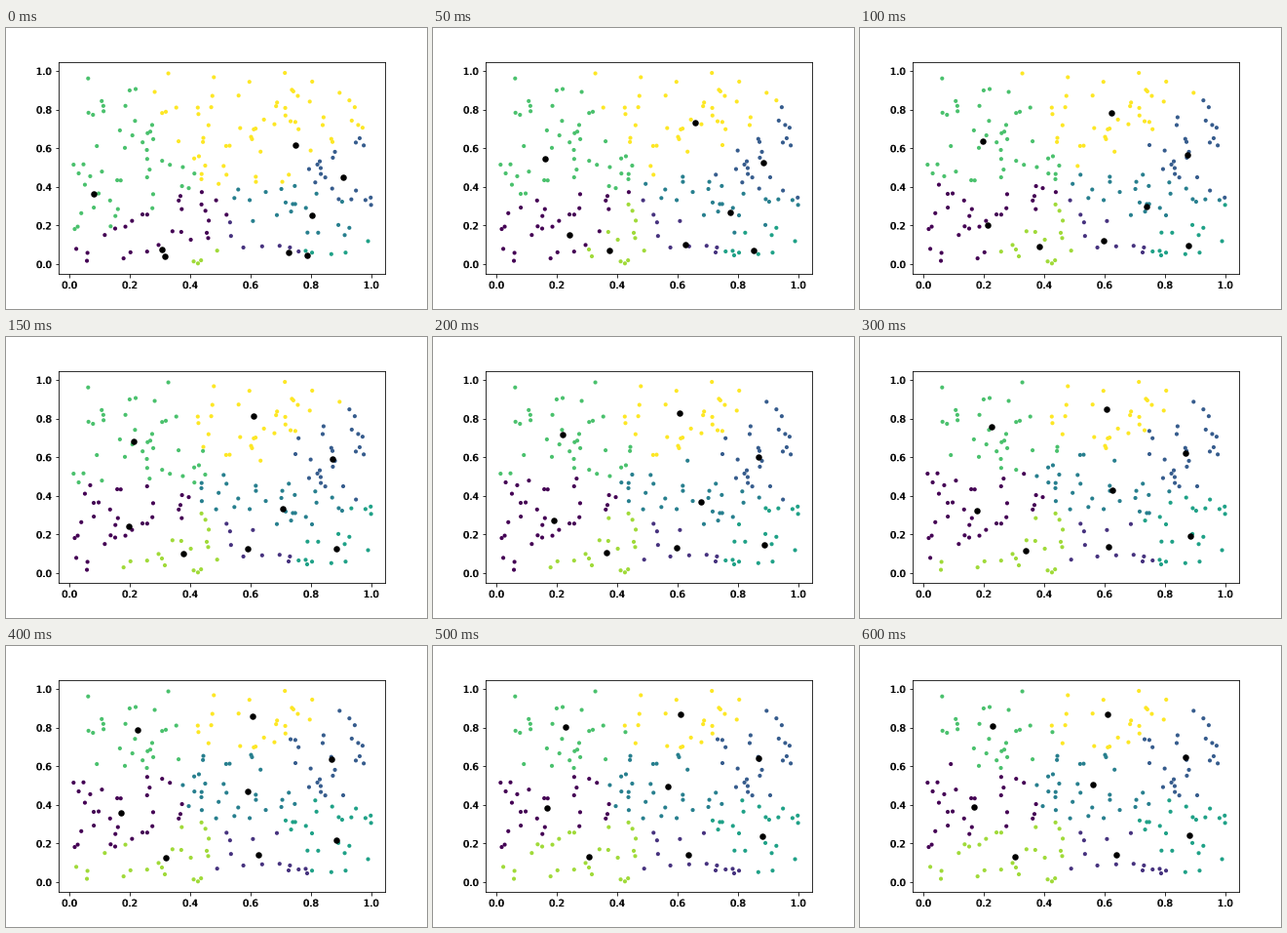
A matplotlib script that plays this animation: 432x288 px, repeating every 0.65 s.

```python
import numpy as np
import matplotlib.pyplot as plt
from matplotlib.animation import FuncAnimation
from matplotlib.patheffects import PathPatchEffect

W, H, DPI = 432, 288, 72
STEPS, INTERVAL = 13, 50
N_POINTS = 200

# Stage position of the data origin and size of one data unit
ORIGIN = np.array([65.3, 242.0])
UNIT = np.array([309.7, -198.0])


def to_data(p):
    return (np.asarray(p, float) - ORIGIN) / UNIT


# Each cluster centre, in stage pixels: where it starts, which way it
# is pulled at first, where it settles
START, PULL, END = to_data([
    [(160, 227), (130, 215), (117, 165)],
    [(290, 230), (230, 217), (263, 214)],
    [(346, 153), (334, 132), (334, 114)],
    [(314, 192), (320, 203), (239, 142)],
    [(309, 233), (344, 236), (338, 194)],
    [(90, 170), (131, 120), (136, 82)],
    [(163, 234), (205, 226), (159, 216)],
    [(297, 120), (248, 86), (254, 70)],
]).swapaxes(0, 1)


def centres_at(step):
    """A quick first jump that fades into a slow drift."""
    jump = 0.4 ** step
    drift = (1 - step / (STEPS - 1)) ** 2
    return END + jump * (START - PULL) + drift * (PULL - END)


def nearest(points, centres):
    gap = points[:, None] - centres[None]
    return (gap ** 2).sum(axis=2).argmin(axis=1)


# The centres start on points of the cloud
rng = np.random.default_rng(8)
cloud = np.vstack([START, rng.random((N_POINTS - len(START), 2))])
palette = plt.get_cmap("viridis")(np.linspace(0, 1, len(START)))

plt.rcParams["font.family"] = "DejaVu Sans"
fig = plt.figure(figsize=(W / DPI, H / DPI), dpi=DPI, facecolor="white")
ax = fig.add_axes([0.125, 0.125, 0.775, 0.755])

left, top = to_data((54, 34.56))
right, bottom = to_data((388.8, 252))
ax.set_xlim(left, right)
ax.set_ylim(bottom, top)

ticks = np.linspace(0, 1, 6)
names = [f"{t:.1f}" for t in ticks]
ax.set_xticks(ticks, names)
ax.set_yticks(ticks, names)

# Digits are printed twice, slightly apart, which makes them heavy
double = [PathPatchEffect(offset=(dx, 0), facecolor="black", edgecolor="none")
          for dx in (-0.6, 0.2)]
for label in ax.get_xticklabels() + ax.get_yticklabels():
    label.set_path_effects(double)

dots = ax.scatter(*cloud.T, s=17, linewidths=0, zorder=3)
marks = ax.scatter(*START.T, s=42, c="black", linewidths=0, zorder=4)


def draw(step):
    centres = centres_at(step)
    dots.set_facecolors(palette[nearest(cloud, centres)])
    marks.set_offsets(centres)
    return dots, marks


anim = FuncAnimation(fig, draw, frames=STEPS, interval=INTERVAL,
                     repeat=True, repeat_delay=0)
plt.show()
```
